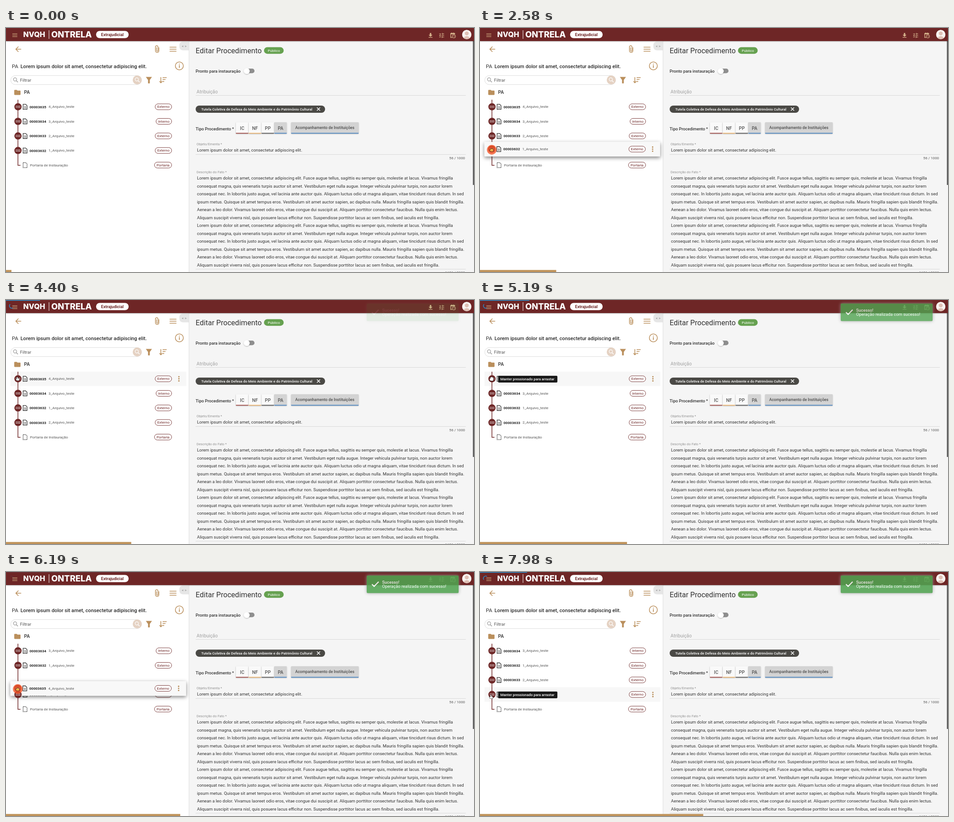
Animation, 1034 px wide and 541 px high, one loop 8 s. Source, as an HTML page:

```html
<!DOCTYPE html>
<html lang="pt">
<head>
<meta charset="utf-8">
<title>Editar Procedimento</title>
<style>
html, body { margin: 0; width: 100%; height: 100%; overflow: hidden; background: #fff; }
svg { display: block; width: 1034px; height: 541px; font-family: Roboto, Arial, sans-serif; }
</style>
</head>
<body>
<svg id="stage" viewBox="0 0 1034 541" xmlns="http://www.w3.org/2000/svg">
  <defs>
    <filter id="shadow" x="-10%" y="-60%" width="120%" height="260%">
      <feDropShadow dx="0" dy="3" stdDeviation="4.5" flood-opacity=".5"/>
    </filter>
    <filter id="soft" x="-30%" y="-30%" width="160%" height="180%">
      <feDropShadow dx="0" dy="1" stdDeviation="1" flood-opacity=".3"/>
    </filter>
    <filter id="glow" x="-10%" y="-40%" width="120%" height="180%">
      <feDropShadow dx="0" dy="0" stdDeviation="3.5" flood-color="#999"/>
    </filter>
    <clipPath id="face"><circle cx="1018" cy="14.5" r="10.5"/></clipPath>
  </defs>
  <g id="page"></g>
  <g id="live"></g>
</svg>
<script>
const MAROON = '#6e2727', GOLD = '#ba8f5c', TAN = '#d9b78f', BLUE = '#2299dd';
const STEP = 200, LOOP = 8000, ROW_TOP = 174.7, ROW_GAP = 32.3;

const text = (x, y, size, str, fill = '#333', weight = 400, anchor = 'start') =>
  `<text x="${x}" y="${y}" font-size="${size}" fill="${fill}" font-weight="${weight}" text-anchor="${anchor}">${str}</text>`;
const rect = (x, y, w, h, fill, r = 0, more = '') =>
  `<rect x="${x}" y="${y}" width="${w}" height="${h}" rx="${r}" fill="${fill}" ${more}/>`;
const circle = (x, y, r, fill, more = '') => `<circle cx="${x}" cy="${y}" r="${r}" fill="${fill}" ${more}/>`;
const line = (d, color, width = 1, more = '') =>
  `<path d="${d}" fill="none" stroke="${color}" stroke-width="${width}" ${more}/>`;
const shape = (d, fill, more = '') => `<path d="${d}" fill="${fill}" ${more}/>`;
const at = (x, y, body) => `<g transform="translate(${x} ${y})">${body}</g>`;

function header() {
  return rect(0, 0, 1034, 29, MAROON, 0, 'filter="url(#soft)"') +
    line('M14 12.8H25M14 16H25M14 19.2H25', '#c8a27a', 1.2) +
    `<g font-family="Inter, sans-serif">` + text(38, 20.3, 16, 'NVQH', '#fff', 800) +
    text(100, 21, 18.6, 'ONTRELA', '#fff', 800) + '</g>' +
    line('M95 5V24', '#fff') +
    rect(199, 6.5, 72, 16, '#fff', 8) + text(235, 17.6, 9, 'Extrajudicial', MAROON, 700, 'middle') +
    shape('M936.5 11h3v4h2.8l-4.3 4.3-4.3-4.3h2.8zM933.7 20h8.6v1.3h-8.6z', TAN) +
    line('M957 13h5M965 13h3M957 16.5h2M962 16.5h6M957 20h4M964 20h4M964.5 11v4M959.5 14.5v4M963.5 18v4', TAN, 1.2) +
    line('M991.5 14V12H982.5V21H985.5M982.5 13.3H991.5M985 10V12M989 10V12', TAN, 1.3) +
    circle(989.5, 18.5, 3.5, MAROON, `stroke="${TAN}" stroke-width="1.2"`) + line('M989.5 16.5V18.7L991 19.5', TAN, .9) +
    `<g clip-path="url(#face)">` + circle(1018, 14.5, 10.5, '#f8f3f0') +
    circle(1018, 12, 4.3, '#dfc0b5') + '<ellipse cx="1018" cy="24" rx="7" ry="6" fill="#dfc0b5"/></g>';
}

function leftPanel() {
  const magnifier = (x, y, color) =>
    circle(x - 1, y - 1, 3.6, 'none', `stroke="${color}" stroke-width="1.2"`) + line(`M${x + 1.7} ${y + 1.7}l3.6 3.6`, color, 1.5);
  return line('M33.5 47H22M27.5 41.3L21.8 47L27.5 52.7', GOLD, 1.6) +
    line('M337.8 43V50.5a3.8 3.8 0 0 1-7.6 0V42a2.8 2.8 0 0 1 5.6 0V50a1.6 1.6 0 0 1-3.2 0V43', GOLD, 1.4) +
    line('M361.5 42.5H376.5M361.5 47H376.5M361.5 51.5H376.5', GOLD, 1.7) +
    shape('M404 30V49.5H391a8 8 0 0 1-8-8V38a8 8 0 0 1 8-8z', '#e6e6e6') +
    text(393.7, 42.7, 8, '&lt; &gt;', '#777', 400, 'middle') +
    text(13, 88.6, 11.6, 'PA') +
    text(32, 88.6, 11.22, 'Lorem ipsum dolor sit amet, consectetur adipiscing elit.', '#2b2b2b', 500) +
    circle(383, 84, 8.8, 'none', `stroke="${GOLD}" stroke-width="1.6"`) +
    line('M383 82.3V88.5M383 79V80.8', GOLD, 1.7) +
    rect(10.5, 105.5, 289, 20, '#fff', 10, 'stroke="#ddd"') + magnifier(21, 115, '#999') +
    text(31, 119, 9.6, 'Filtrar', '#555') + circle(290, 115.3, 10, '#e5d2c3') + magnifier(290, 115, '#fff') +
    shape('M309 108.5H322.5L317.7 115.2V122.8H313.8V115.2z', GOLD) +
    line('M342.2 109V121M339 118L342.2 121.5L345.4 118M346 110H355M346 114.3H352.5M346 118.6H349.5', GOLD, 1.6) +
    shape('M19.5 137.2h4.3l1.5 1.6h5.5a1.3 1.3 0 0 1 1.3 1.3v7a1.3 1.3 0 0 1-1.3 1.3H19.5a1.3 1.3 0 0 1-1.3-1.3v-8.6a1.3 1.3 0 0 1 1.3-1.3z', GOLD) +
    text(40, 146, 10.4, 'PA', '#333', 500);
}

const DESCRIPTION = [
  'Lorem ipsum dolor sit amet, consectetur adipiscing elit. Fusce augue tellus, sagittis eu semper quis, molestie at lacus. Vivamus fringilla',
  'consequat magna, quis venenatis turpis auctor sit amet. Vestibulum eget nulla augue. Integer vehicula pulvinar turpis, non auctor lorem',
  'consequat nec. In lobortis justo augue, vel lacinia ante auctor quis. Aliquam luctus odio ut magna aliquam, vitae tincidunt risus dictum. In sed',
  'ipsum metus. Quisque sit amet tempus eros. Vestibulum sit amet auctor sapien, ac dapibus nulla. Mauris fringilla sapien quis blandit fringilla.',
  'Aenean a leo dolor. Vivamus laoreet odio eros, vitae congue dui suscipit at. Aliquam porttitor consectetur faucibus. Nulla quis enim lectus.',
  'Aliquam suscipit viverra nisl, quis posuere lacus efficitur non. Suspendisse porttitor lacus ac sem finibus, sed iaculis est fringilla.'
];

function form() {
  const rule = y => line(`M419 ${y}H1016`, '#d9d9d9');
  const button = (x, w, label, color, fill) =>
    rect(x, 209, w, 25, fill, 1, 'filter="url(#soft)"') + rect(x, 232.6, w, 1.5, color) + label;
  const types = [['IC', '#9c3a35', '#f9f9f9'], ['NF', '#efb060', '#f9f9f9'], ['PP', '#4a4a4a', '#f9f9f9'], ['PA', '#3f80c4', '#d4d4d4']];
  return rect(404, 29, 630, 512, '#f5f5f5') + line('M404.3 29V541', '#dedede') +
    text(419, 55.8, 16.13, 'Editar Procedimento') +
    rect(570, 42.5, 43.5, 14.7, '#66a150', 7.3) + text(591.8, 52.7, 8.1, 'Público', '#fff', 400, 'middle') +
    text(419, 98.6, 9.25, 'Pronto para instauração', '#333', 500) +
    rect(527, 90, 22, 10.3, '#8e8e8e', 5.1) + circle(532, 95.5, 6.5, '#fff', 'filter="url(#soft)"') +
    text(421, 145, 10.3, 'Atribuição', '#a0a0a0') + rule(149.5) +
    rect(419, 172, 286, 16, '#4a4945', 8) +
    text(431.5, 183, 7.95, 'Tutela Coletiva de Defesa do Meio Ambiente e do Patrimônio Cultural', '#fff', 500) +
    line('M687 176.2L694 183.2M694 176.2L687 183.2', '#fff', 1.5) +
    text(419, 226.6, 9.2, 'Tipo Procedimento *', '#333', 500) +
    types.map(([name, color, fill], i) => {
      const x = 508 + i * 28.3;
      return button(x, 27.4, text(x + 13.8, 226.3, 10, name, '#555', 500, 'middle'), color, fill);
    }).join('') +
    button(630, 149, text(639, 223.8, 8.68, 'Acompanhamento de Instituições', '#4c4c4c', 500), '#3f80c4', '#d3d3d3') +
    text(421, 260.3, 7.6, 'Objeto/Ementa *', '#909090') +
    text(422, 274.4, 9.45, 'Lorem ipsum dolor sit amet, consectetur adipiscing elit.') + rule(280.5) +
    text(1014, 291.4, 8.1, '56 / 1000', '#555', 400, 'end') +
    text(421, 322.3, 7.65, 'Descrição do Fato *', '#909090') +
    [...DESCRIPTION, ...DESCRIPTION].map((s, i) => text(422, 336.2 + i * 17.49, 9.45, s)).join('') +
    rule(534.8) + text(1014, 544.8, 8.1, '1681 / 2000', '#555', 400, 'end') +
    rect(1031.6, 29, 2.4, 319, '#555');
}

const PILL_WIDTH = { Externo: 36.5, Interno: 34.5, Portaria: 38 };
const pill = (label, y) => {
  const w = PILL_WIDTH[label];
  return rect(366 - w, y - 6.5, w, 13, '#fff', 6.5, `stroke="${MAROON}" stroke-width=".9"`) +
    text(366 - w / 2, y + 2.7, 8, label, MAROON, 400, 'middle');
};
const sheet = (y, dash = '') =>
  line(`M37.8 ${y - 5.5}H43.5L46.5 ${y - 2.5}V${y + 5.7}H37.8Z`, '#333', 1.3, dash && `stroke-dasharray="${dash}"`);
const menuDots = y => [-4.6, 0, 4.6].map(d => circle(382, y + d, 1.6, GOLD)).join('');
const grip = y => circle(26.5, y, 8, MAROON) +
  line(`M21.6 ${y - 1.4}H32M21.6 ${y + 1.4}H32`, '#fff', 1.3, 'stroke-dasharray="1.4 .8"');

const fileRow = (id, y) =>
  sheet(y) + line(`M40 ${y}H44.5M40 ${y + 2.7}H44.5`, '#333') +
  text(52, y + 2.9, 8.05, '0000' + id, '#222', 700) +
  text(94, y + 2.7, 8.06, `${id - 3631}_Arquivo_teste`, '#555') +
  pill(id === 3634 ? 'Interno' : 'Externo', y);

// Keyframes are [step, ...values], joined by straight lines.
function track(keys, k) {
  const i = keys.findIndex(key => key[0] >= k);
  if (i < 0) return keys[keys.length - 1].slice(1);
  if (i === 0) return keys[0].slice(1);
  const a = keys[i - 1], b = keys[i], u = (k - a[0]) / (b[0] - a[0]);
  return a.slice(1).map((v, n) => v + (b[n + 1] - v) * u);
}
const POINTER = [[1, 975, 480], [3, 520, 360], [5, 60, 285], [6, 26, 273], [12, 26, 272], [13, 26, 270], [16, 25, 238],
  [17, 25, 235], [18, 25, 228], [20, 26, 200], [22, 26, 175], [28, 26, 176], [30, 26, 225], [31, 26, 259.5],
  [32, 26, 272], [34, 25, 275], [40, 25, 277]];
const DRAGS = [{ id: 3632, from: 13, to: 16 }, { id: 3635, from: 28, to: 33 }];
const LOADS = [
  { from: 18, to: 31, turn: -80, keys: [[18, 21], [22, 75], [26, 109], [29, 140], [30, 1034]] },
  { from: 37, to: 40, turn: 0, keys: [[37, 21], [40, 104]] }
];
const within = (k, a, b) => k >= a && k <= b;
const rowY = i => ROW_TOP + i * ROW_GAP;

function fileList(k) {
  let order = [3635, 3634, 3633, 3632], dragged = '';
  for (const { id, from, to } of DRAGS) {
    if (k < from) continue;
    const y = track(POINTER, Math.min(k, to))[1] - 1.5;
    const slot = Math.max(0, Math.min(3, Math.floor((y - ROW_TOP) / ROW_GAP + .3)));
    order = order.filter(other => other !== id);
    order.splice(slot, 0, k <= to ? 0 : id);
    if (k <= to) {
      dragged = at(-.6, 0, rect(10.5, y - 16, 388, 32.3, '#f8f8f8', 1, 'filter="url(#shadow)"') +
        grip(y) + fileRow(id, y) + menuDots(y));
    }
  }
  const [px, py] = track(POINTER, k);
  const hover = !dragged && k > 3 && px < 398 ? Math.round((py - ROW_TOP) / ROW_GAP) : -1;
  const last = rowY(4);
  const eachRow = draw => order.map((id, i) => id ? draw(id, rowY(i)) : '').join('');
  return (hover >= 0 ? rect(10, rowY(hover) - 16, 388.5, 32, '#f7f7f7') + menuDots(rowY(hover)) : '') +
    line(`M26.4 159V${last + .6}H32`, MAROON, 1.5) + eachRow(fileRow) +
    sheet(last, '2 1.2') + text(53, last + 2.7, 8.05, 'Portaria de Instauração', '#555') + pill('Portaria', last) +
    dragged + eachRow((id, y) => grip(y));
}

function loader(k) {
  const load = LOADS.find(l => within(k, l.from, l.to));
  if (!load) return '';
  return `<g opacity="${k === 31 ? .1 : 1}">` + rect(0, 0, track(load.keys, k)[0], 1.4, BLUE) +
    at(12, 13.5, line('M-3.5 3.5A5 5 0 0 1 3.5 -3.5', BLUE, 1.3, `transform="rotate(${load.turn + k % 2 * 180})"`)) + '</g>';
}

function toast(k) {
  if (k < 22) return '';
  return `<g opacity="${Math.min(.88, (k - 21.4) * .175)}">` +
    rect(797, 7.8, 203, 39, '#51a351', 2, 'filter="url(#glow)"') +
    line('M808.5 27.2L813.3 31.9L823.3 21.7', '#fff', 2.4) +
    text(831, 25.5, 9.3, 'Sucesso!', '#fff', 500) + text(831, 34.6, 9.45, 'Operação realizada com sucesso!', '#fff') + '</g>';
}

function tooltip(k) {
  const row = within(k, 9, 11) || k >= 38 ? 3 : within(k, 24, 27) ? 0 : -1;
  if (row < 0) return '';
  const y = rowY(row) + .9;
  return rect(40, y - 7.5, 131, 15, '#1a1a1a', 2) + text(45, y + 2.6, 7.97, 'Manter pressionado para arrastar', '#fff', 500);
}

function pointer(k) {
  if (k < 1) return '';
  const [x, y] = track(POINTER, k);
  const held = DRAGS.some(d => within(k, d.from, d.to));
  const pressed = within(k, 12, 17) || within(k, 27, 34);
  const hand = (d, fill = '#fff') => line(d, '#222', 3, 'stroke-linecap="round"') + line(d, fill, 1.7, 'stroke-linecap="round"');
  const palm = 'M-2 1H2.3M-2 2.6H2.3';
  let icon;
  if (k < 5) icon = shape('M0 0V11L2.6 8.6L4.4 12.5L6 11.8L4.3 8H8z', '#fff', 'stroke="#222" stroke-width=".8"');
  else if (held) icon = hand(palm + 'M-2.2 -1V1M-.7 -1.5V1M.8 -1.5V1M2.3 -1V1M-3.6 1.2L-2 2.5', '#f9b04a');
  else if (within(k, 18, 22) || k > 34) icon = hand(palm + 'M-1 -3.5V1M.6 -.6V1M2.3 0V1M-3.2 .6L-2 2.5');
  else icon = hand(palm + 'M-2.3 -2.8V1M-.8 -4V1M.8 -4V1M2.4 -2.8V1M-4 .2L-2 2.6');
  return at(x, y, (pressed ? circle(0, 0, 10.7, '#f4572a', 'opacity=".8"') : '') + icon);
}

const page = document.getElementById('page'), live = document.getElementById('live');
page.innerHTML = leftPanel() + form() + header();

let shown = -1;
function tick(now) {
  const k = Math.floor((now % LOOP + 20) / STEP);
  if (k !== shown) {
    shown = k;
    live.innerHTML = fileList(k) + loader(k) + toast(k) + tooltip(k) + pointer(k) +
      rect(0, 536.5, 12.03 * (k + 1), 4.5, '#c0935a');
  }
  requestAnimationFrame(tick);
}
tick(0);
</script>
</body>
</html>
```
